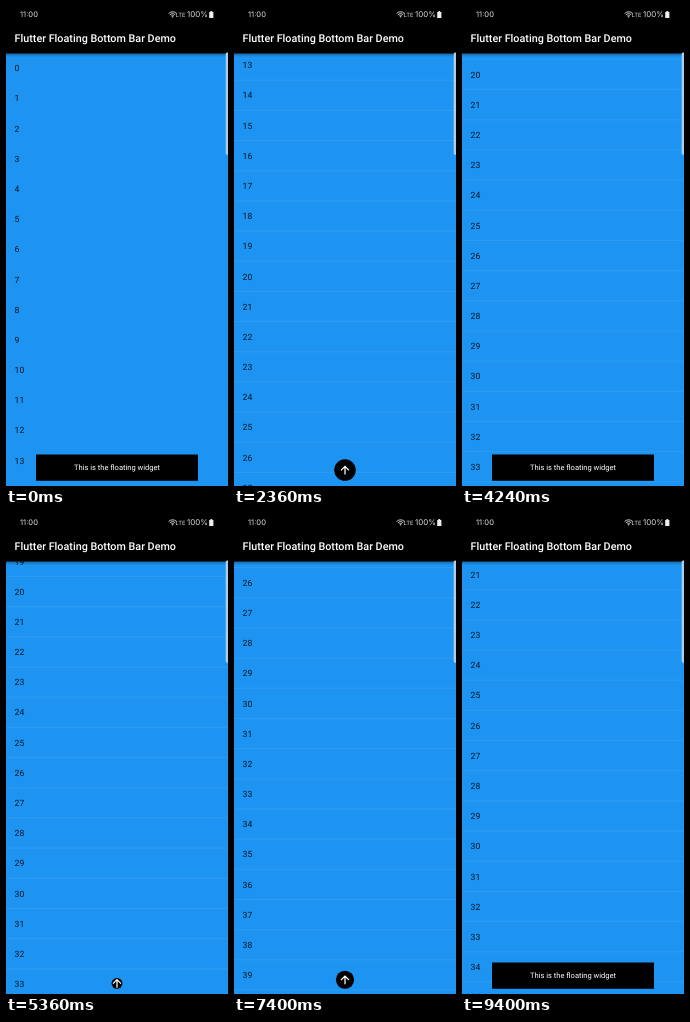
Animation of 222x480 px, one loop 9.44 s. Source, as an HTML page with a canvas:

```html
<!DOCTYPE html>
<html lang="en">
<head>
<meta charset="utf-8">
<title>Floating bottom bar</title>
<style>
  html, body { margin: 0; width: 100%; height: 100%; overflow: hidden; background: #000; }
  canvas { display: block; width: 222px; height: 480px; }
</style>
</head>
<body>
<canvas></canvas>
<script>
const W = 222, H = 480, LOOP = 9440;
const DP = W / 412;
const TOP = 47, ROW = 56 * DP;
const canvas = document.querySelector('canvas');
const ctx = canvas.getContext('2d');
const ratio = window.devicePixelRatio || 1;
canvas.width = W * ratio;
canvas.height = H * ratio;

// Each swipe eases the list to a new offset; its direction hides or shows the bar.
const swipes = [
  { start: 1080, end: 3360, to: 668 },
  { start: 3400, end: 4880, to: 549.7 },
  { start: 5160, end: 6500, to: 877.8 },
  { start: 6600, end: 7100, to: 731.8 },
  { start: 7130, end: 8100, to: 912 },
  { start: 8240, end: 9400, to: 635.2 }
];

const clamp = x => Math.min(1, Math.max(0, x));
const easeIn = x => x ** 1.7;
const fling = x => 1 - (1 - x ** 1.3) ** 1.4;

function stateAt(time) {
  let scroll = 0, shown = true, since = -LOOP;
  for (const { start, end, to } of swipes) {
    if (time < start) break;
    shown = to < scroll;
    since = start;
    scroll += (to - scroll) * fling(clamp((time - start) / (end - start)));
  }
  const slide = clamp((time - since) / 200);
  const grow = easeIn(clamp((time - since) / 300));
  return { scroll, lowered: shown ? 1 - slide : slide, button: shown ? 1 - grow : grow };
}

function rect(x, y, w, h, color) {
  ctx.fillStyle = color;
  ctx.fillRect(x, y, w, h);
}

function text(string, x, y, font, color, align = 'left') {
  ctx.font = font;
  ctx.fillStyle = color;
  ctx.textAlign = align;
  ctx.fillText(string, x, y);
}

function drawList(scroll) {
  rect(0, TOP, W, H - TOP, '#1d94f2');
  const first = Math.max(0, Math.floor(scroll / ROW) - 1);
  for (let i = first; i < first + 18; i++) {
    const y = TOP + i * ROW - scroll;
    if (scroll > 0 && i > 0) rect(0, y - .5, W, 1, 'rgba(255,255,255,.07)');
    text(i, 8.6, y + ROW / 2 + 3.2, `${16 * DP}px Roboto, sans-serif`, 'rgba(0,0,0,.87)');
  }
  const shadow = ctx.createLinearGradient(0, TOP, 0, TOP + 4);
  shadow.addColorStop(0, 'rgba(0,0,0,.35)');
  shadow.addColorStop(1, 'rgba(0,0,0,0)');
  rect(0, TOP, W, 4, shadow);
}

function drawHeader() {
  rect(0, 0, W, TOP + .5, '#000');
  const status = '7.6px Inter, sans-serif', gray = '#ddd';
  text('11:00', 14, 11.3, status, gray);
  text('100%', 202, 11.3, '7.9px Inter, sans-serif', gray, 'right');
  text('LTE', 169.6, 11, '5.8px Inter, sans-serif', gray);

  ctx.strokeStyle = gray;
  ctx.lineWidth = .9;
  for (let radius = 1.8; radius < 6; radius += 1.8) {
    ctx.beginPath();
    ctx.arc(166.6, 11.2, radius, -Math.PI * .77, -Math.PI * .23);
    ctx.stroke();
  }
  rect(166, 10.2, 1.2, 1.2, gray);
  rect(203.2, 6, 4.2, 6, '#eee');
  rect(204.4, 5, 1.8, 1, '#eee');

  text('Flutter Floating Bottom Bar Demo', 8.6, 36.2, `500 ${20 * DP}px Roboto, sans-serif`, '#fff');
}

function drawEdgeHandle() {
  ctx.fillStyle = '#a9cfee';
  ctx.beginPath();
  ctx.roundRect(219.7, 46.5, 4, 102.3, 1.5);
  ctx.fill();
}

function drawButton(size) {
  const radius = 20 * DP * size, y = 474.8 - radius;
  if (radius < .2) return;
  ctx.save();
  ctx.beginPath();
  ctx.arc(W / 2, y, radius, 0, Math.PI * 2);
  ctx.fillStyle = '#000';
  ctx.fill();
  ctx.clip();
  ctx.translate(W / 2, y);
  ctx.beginPath();
  ctx.moveTo(0, 4.4);
  ctx.lineTo(0, -3.5);
  ctx.moveTo(-4, .3);
  ctx.lineTo(0, -3.7);
  ctx.lineTo(4, .3);
  ctx.strokeStyle = '#fff';
  ctx.lineWidth = 1.25;
  ctx.stroke();
  ctx.restore();
}

function drawBar(lowered) {
  const y = 448.5 + lowered * 53;
  rect(30, y, 162, 26.3, '#000');
  text('This is the floating widget', W / 2, y + 15.8, `${14 * DP}px Roboto, sans-serif`, '#fff', 'center');
}

function render(now) {
  const { scroll, lowered, button } = stateAt(now % LOOP);
  ctx.setTransform(ratio, 0, 0, ratio, 0, 0);
  ctx.textRendering = 'geometricPrecision';
  drawList(scroll);
  drawHeader();
  drawEdgeHandle();
  drawButton(button);
  drawBar(lowered);
}

const start = performance.now();
function tick() {
  render(performance.now() - start);
  requestAnimationFrame(tick);
}
tick();
</script>
</body>
</html>
```
